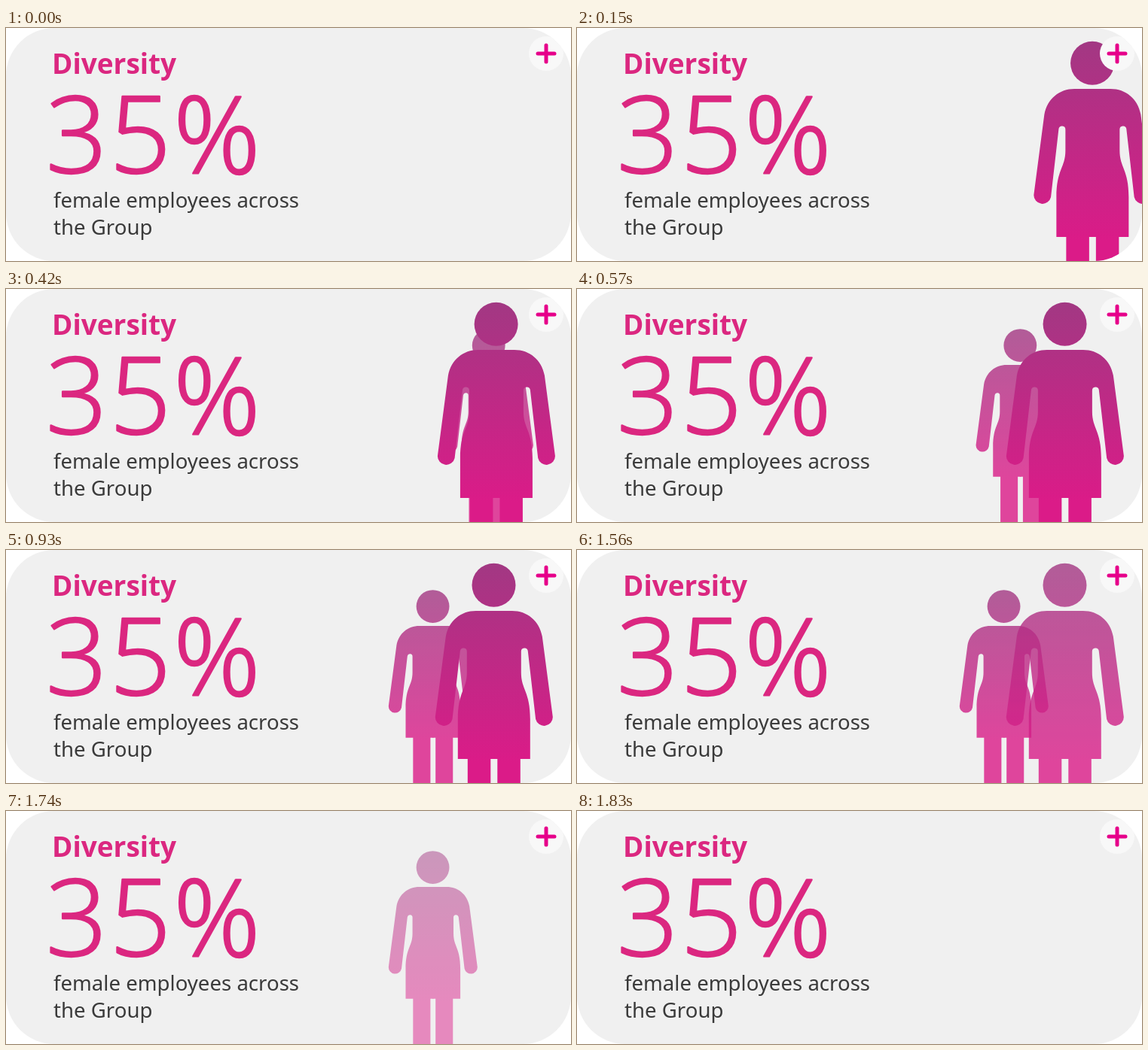
An HTML page for the animation above (1890 ms loop, 750 px wide and 310 px high).

```html
<!DOCTYPE html>
<html lang="en">
<head>
<meta charset="utf-8">
<title>Diversity</title>
<style>
  html, body { margin: 0; width: 100%; height: 100%; overflow: hidden; background: #fff; }
  svg { display: block; width: 750px; height: 310px; border-radius: 64px; background: #f0f0f0; }
  text { font-family: "Noto Sans", "Open Sans", sans-serif; }
  .accent { fill: #db2780; }
  .title { font-size: 37px; font-weight: 700; }
  .figure { font: 300 143px "Open Sans", "Noto Sans", sans-serif; letter-spacing: 3px;
            stroke: #db2780; stroke-width: 2.4px; stroke-linejoin: round; }
  .label { font-size: 27.6px; fill: #3a3a3a; }
</style>
</head>
<body>
<svg viewBox="0 0 750 310">
  <defs>
    <linearGradient id="tone" gradientUnits="userSpaceOnUse" x1="0" y1="0" x2="0" y2="265">
      <stop offset="0" stop-color="#a23883"/>
      <stop offset="1" stop-color="#db1b88"/>
    </linearGradient>
    <path id="half" d="M-1 63H24C44 63 60 76 64 97L78 204A11.5 11.5 0 0 1 55.3 207
      L44.9 116A4.5 4.5 0 0 0 36 117V145C36 168 48 170 48 207V260H35V400H4.5V260H-1Z"/>
    <g id="woman" fill="url(#tone)">
      <circle cx="-.3" cy="28.8" r="29"/>
      <use href="#half"/>
      <use href="#half" transform="scale(-1 1)"/>
    </g>
  </defs>

  <text class="accent title" x="61" y="61">Diversity</text>
  <text class="accent figure" x="53" y="192.5">35%</text>
  <text class="label" x="63" y="239">female employees across</text>
  <text class="label" x="63" y="275">the Group</text>

  <use id="back" href="#woman"/>
  <use id="front" href="#woman"/>

  <circle cx="717" cy="34" r="23" fill="#f8f8f8"/>
  <path d="M706 34H728M717 23V45" stroke="#e6008a" stroke-width="5" stroke-linecap="round"/>
</svg>
<script>
const LOOP = 1890, STEP = 30, SLIDE = 600, FADE = 150;

const women = [
  { id: "front", x: 647.8, y: 18, scale: 1, opacity: 1, travel: 217, enter: 0, leave: 1530 },
  { id: "back", x: 566.8, y: 53.3, scale: 0.756, opacity: 0.8, travel: 264, enter: 330, leave: 1680 },
].map(w => ({ ...w, node: document.getElementById(w.id) }));

const clamp = v => Math.min(1, Math.max(0, v));
const bezier = (a, b, s) => 3 * (1 - s) ** 2 * s * a + 3 * (1 - s) * s * s * b + s ** 3;

// Fast start, long soft landing: cubic-bezier(.05, .7, .1, 1)
function easeOut(p) {
  let low = 0, high = 1;
  for (let i = 0; i < 24; i++) {
    const mid = (low + high) / 2;
    if (bezier(0.05, 0.1, mid) < p) low = mid; else high = mid;
  }
  return bezier(0.7, 1, high);
}

function draw(now) {
  const t = Math.floor((now % LOOP) / STEP) * STEP;
  for (const w of women) {
    const offset = w.travel * (1 - easeOut(clamp((t - w.enter) / SLIDE)));
    const fade = 1 - clamp((t - w.leave) / FADE);
    w.node.setAttribute("transform", `translate(${w.x + offset} ${w.y}) scale(${w.scale})`);
    w.node.setAttribute("opacity", w.opacity * fade);
  }
}

const start = performance.now();
function tick() {
  draw(performance.now() - start);
  requestAnimationFrame(tick);
}
tick();
</script>
</body>
</html>
```
